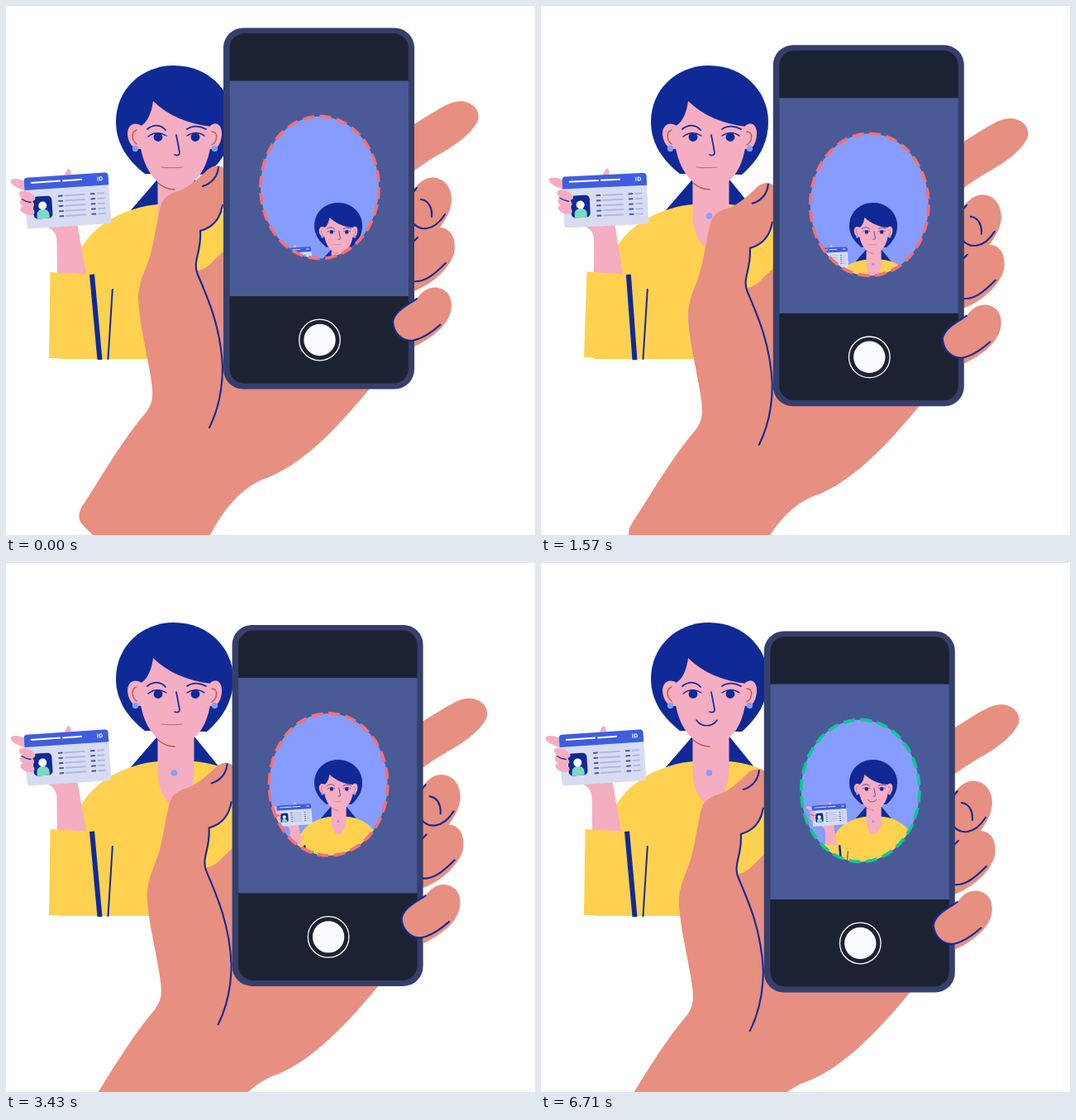
Animation, 640 px wide and 640 px high, one loop 6780 ms. Source, as an HTML page:

```html
<!DOCTYPE html>
<html lang="en">
<head>
<meta charset="utf-8">
<title>Identity check</title>
<style>
  html, body { margin: 0; width: 100%; height: 100%; overflow: hidden; background: #fff; }
  svg { display: block; width: 100vw; height: 100vh; }
  .line { fill: none; stroke: #102a97; stroke-linecap: round; stroke-linejoin: round; }
  .brown { fill: none; stroke: #b9603c; stroke-width: 1.4; stroke-linecap: round; }
  .navy { fill: #0f2a97; }
  .pink { fill: #f5adc2; }
  .yellow { fill: #ffd150; }
  .skin { fill: #e78f80; }
  .jewel { fill: #869dff; }
</style>
</head>
<body>
<svg viewBox="0 0 640 640" xmlns="http://www.w3.org/2000/svg">
  <defs>
    <clipPath id="oval"><ellipse id="ovalClip" cx="379.5" cy="219.5" rx="71.5" ry="86"/></clipPath>
  </defs>

  <g id="person">
    <path class="navy" d="M183 210 L151 247 H258 L228 210Z"/>
    <path class="navy" d="M133 140C133 101 164 72 203 72C245 72 275 103 275 140C275 170 259 190 243 204L168 203C149 188 133 168 133 140Z"/>
    <path class="yellow" d="M184 240C148 243 108 262 91 293L84 340L64 427H326C325 360 326 320 316 293C301 262 265 243 228 240Z"/>
    <path class="pink" d="M183.500 200V255C185 276 193 290 203 294C215 290 226 276 227.500 255V200Z"/>
    <circle class="jewel" cx="203.500" cy="254" r="3.800"/>
    <path class="pink" d="M164 145C154 139 147 145 147 155C148 167 155 176 166 172ZM247 145C256 138 262 146 261 156C260 168 254 177 245 172Z"/>
    <path class="pink" d="M178 115C195 132 220 143 249 146L248 166C245 188 238 205 222 216C212 224 199 223 188 216C174 206 165 189 162 166V146C171 141 176 130 178 115Z"/>
    <path class="brown" d="M158 150C151 152 152 163 158 167M249 152C257 152 256 164 249 168M184 214Q193 222 204 222"/>
    <circle class="jewel" cx="156.500" cy="172.500" r="3.700"/>
    <circle class="jewel" cx="252.500" cy="172.500" r="3.700"/>
    <path class="line" stroke-width="1.800" d="M171 149C178 143 187 143 193 150M219 149C226 144 235 145 242 149"/>
    <g id="eyes">
      <circle class="navy" cx="184" cy="158.500" r="5.400"/>
      <circle class="navy" cx="229" cy="158.500" r="5.400"/>
      <path class="line" stroke-width="1.400" d="M172 158Q182 150 194 157M219 157Q230 150 240 157"/>
    </g>
    <path class="line" stroke-width="1.700" d="M206 156L210 177Q210 182 204 180"/>
    <path class="line" id="mouth"/>
    <path class="line" stroke-width="2" stroke-linecap="butt" d="M128.800 343L123.500 427"/>

    <g id="arm">
      <path class="pink" d="M48 267C58 270 61 276 61.500 284L62 330H98L86 262Z"/>
      <path class="pink" d="M70 206L74 198Q77 196 78 199L79 206Z"/>
      <path class="pink" d="M24 224C14 220 6 217 5.500 212C6 208 15 208 25 213Z"/>
      <path class="yellow" d="M53.500 322L104 325L113 427L52 426Z"/>
      <path class="navy" d="M101 325L107 324.500L116.500 428H110.500Z"/>
      <g id="card" transform="translate(21.500 208) rotate(-3.800)">
        <rect width="102" height="62" rx="4" fill="#d8dcf3"/>
        <path d="M0 15V4Q0 0 4 0H98Q102 0 102 4V15Z" fill="#3f5de0"/>
        <path d="M8 6.500H44M46.500 6.500H70" stroke="#fff" stroke-width="2"/>
        <text x="88" y="9.500" fill="#fff" font-family="'Open Sans', sans-serif" font-size="7" font-weight="700">ID</text>
        <rect x="9" y="23.500" width="23" height="27" rx="5" class="navy"/>
        <path d="M13 50.500V46C13 37 28 37 28 46V50.500Z" fill="#7bdac3"/>
        <circle cx="20.500" cy="35" r="5" fill="#fff"/>
      </g>
      <g class="pink">
        <ellipse cx="25.500" cy="230" rx="10.500" ry="5.200" transform="rotate(22 25.500 230)"/>
        <ellipse cx="25.500" cy="239" rx="9" ry="5" transform="rotate(16 25.500 239)"/>
        <ellipse cx="26" cy="247.500" rx="9" ry="5" transform="rotate(20 26 247.500)"/>
      </g>
      <path class="line" stroke-width="1.300" d="M19 233.500Q24 237 30 237.500"/>
    </g>
  </g>

  <g class="held">
    <path class="skin" d="M266 199C261 191 251 192 244 198C232 209 222 219 208 224C194 228 189 234 187 243C182 262 179 288 174 303C168 322 160 335 160 354C161 384 171 420 176 455C178 472 178 479 170 491C140 526 117 567 93 604C87 613 87 621 92 627L105 640V650H241L247 640C261 613 282 585 310 573C360 556 404 506 440 463L400 300H275L263 297C252 306 243 320 231 320C227 312 236 300 235 272C250 268 260 258 262 241L266 240Z"/>
    <path class="skin" d="M485 148C506 137 527 120 543 116C560 112 575 124 571 138C565 153 545 167 530 176C514 185 500 194 485 206Z"/>
    <path class="skin" d="M485 235C494 219 503 208 516 207.500C532 208 540 222 539 237C538 248 532 258 525 268C541 269 545 286 542 299C536 319 514 339 485 348Z"/>
    <g class="line" stroke-width="2.100">
      <path d="M257 195C256 207 248 215 238 218"/>
      <path d="M262 241C259 258 250 268 235 272C237 297 225 309 232 325C245 355 260 390 262 437C262 468 255 492 246 510"/>
      <path d="M492 226L497 220M502 234C511 235 516 244 515 255M492 262C500 272 517 274 531 252M492 286L498 280M492 333C506 335 518 325 532 311"/>
    </g>

    <rect x="263" y="26.500" width="231" height="437" rx="24" fill="#343f6c"/>
    <rect x="270.500" y="33" width="216.500" height="423.500" rx="18" fill="#1d2233"/>
    <rect x="270.500" y="90.500" width="216.500" height="260.500" fill="#495a97"/>
    <ellipse cx="379.500" cy="219.500" rx="71.500" ry="86" fill="#869dff"/>
    <circle cx="379.500" cy="404" r="24.800" fill="none" stroke="#fff" stroke-width="1.300"/>
    <circle cx="379.500" cy="404" r="19.200" fill="#fafbff"/>
  </g>

  <g clip-path="url(#oval)">
    <use href="#person" transform="translate(318.600 208.600) scale(.409)"/>
  </g>

  <g class="held">
    <ellipse id="ring" cx="379.500" cy="219.500" rx="71.500" ry="86" fill="none" stroke-width="3.800" pathLength="240" stroke-dasharray="6.700 3.300"/>
    <path class="skin" d="M497 354C504 344 513 339 523 341C537 344 541 357 538 370C533 389 514 402 494 412V405C481 406 469 396 468 383C470 369 485 362 497 354Z"/>
    <path class="line" stroke-width="2.100" d="M497 354C485 362 470 369 468 382C469 396 479 405 491 405C504 403 516 394 525.500 385.500"/>
  </g>
</svg>
<script>
  const LOOP = 6780, SWAY = LOOP / 2;
  const SVG = 'http://www.w3.org/2000/svg';
  const el = id => document.getElementById(id);
  const held = document.querySelectorAll('.held');

  // Text rows on the card
  for (let i = 0; i < 5; i++) {
    const y = 24.6 + 6.15 * i;
    [['M40 YH45.500M79 YH84.500', '#4358ad'], ['M47.500 YH72.500M87 YH96', '#b0b9e2']].forEach(([d, stroke]) => {
      const row = document.createElementNS(SVG, 'path');
      row.setAttribute('d', d.replaceAll('Y', y));
      row.setAttribute('stroke', stroke);
      row.setAttribute('stroke-width', 2);
      el('card').append(row);
    });
  }

  // Path of the phone
  const times = [0, 710, 1430, 1570, 2140, 2860, 3570, 4000];
  const xs = [0, 8.9, 16.8, 17.8, 18, 14.7, 9.6, 6.8];
  const ys = [0, 9, 18.4, 20.8, 30.2, 40.5, 50.3, 56];

  const clamp = v => Math.max(0, Math.min(1, v));
  const smooth = v => v * v * (3 - 2 * v);

  function spline(values, t) {
    const last = times.length - 1;
    if (t >= times[last]) return values[last];
    const i = times.findIndex((_, k) => t < times[k + 1]);
    const slope = k => {
      const a = Math.max(0, k - 1), b = Math.min(last, k + 1);
      return (values[b] - values[a]) / (times[b] - times[a]);
    };
    const h = times[i + 1] - times[i], u = (t - times[i]) / h, s = smooth(u);
    return values[i] * (1 - s) + values[i + 1] * s
      + h * u * (1 - u) * ((1 - u) * slope(i) - u * slope(i + 1));
  }

  function draw(t) {
    const move = `translate(${spline(xs, t)} ${spline(ys, t)})`;
    held.forEach(g => g.setAttribute('transform', move));
    el('ovalClip').setAttribute('transform', move);

    const angle = 0.53 * (1 - Math.cos(2 * Math.PI * t / SWAY));
    el('arm').setAttribute('transform', `rotate(${angle} 100 427)`);

    const smile = smooth(clamp((t - 3650) / 950));
    const corner = 195 - 5 * smile;
    el('mouth').setAttribute('d', `M188 ${corner}C194 ${196 + 3 * smile} 207 ${196 + 3 * smile} 213 ${corner}`);
    el('mouth').style.strokeWidth = 0.8 + 0.8 * clamp(smile * 2);
    el('mouth').style.stroke = smile > 0.1 ? '#102a97' : '#a4576f';

    const open = 1 - 0.9 * smooth(clamp(1 - Math.abs(t - 4680) / 170));
    el('eyes').setAttribute('transform', `translate(0 ${158.5 * (1 - open)}) scale(1 ${open})`);

    el('ring').setAttribute('stroke', t < 4150 ? '#f4707a' : '#0cc993');
  }

  const start = performance.now();
  function tick() {
    draw((performance.now() - start) % LOOP);
    requestAnimationFrame(tick);
  }
  tick();
</script>
</body>
</html>
```
